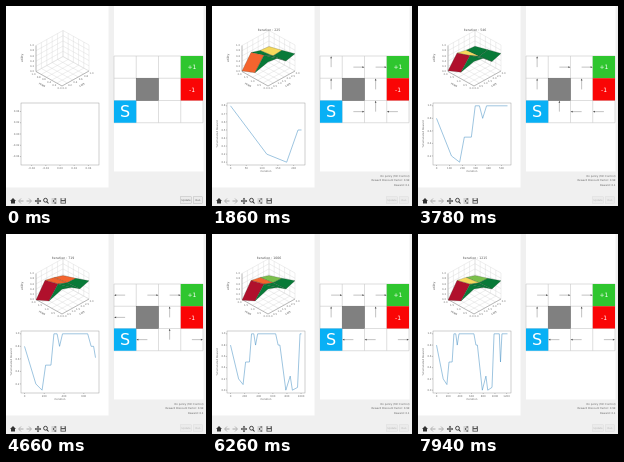
Animation, 200 px wide and 200 px high, one loop 8000 ms. Source, as an HTML page with a canvas:

```html
<!DOCTYPE html>
<html>
<head>
<meta charset="utf-8">
<style>
html, body { margin: 0; width: 100%; height: 100%; overflow: hidden; background: #f0f0f0; }
canvas { display: block; width: 200px; height: 200px; }
</style>
</head>
<body>
<canvas id="stage"></canvas>
<script>
const canvas = document.getElementById('stage');
const ctx = canvas.getContext('2d');
const ratio = window.devicePixelRatio || 1;
canvas.width = canvas.height = 200 * ratio;

const LOOP = 8000, START = 500, STEP = 80;
const heldSteps = [7, 10, 15, 18, 26, 31, 43, 78, 81, 86, 91];
const progress = [[-1, 0], [9, 118], [41, 546], [62, 877], [82, 1135], [93, 1215]];
const palette = { r: '#b0102c', o: '#f4642e', y: '#f5d95c', l: '#7cc04c', g: '#087a38' };

// Colours of the back row of faces, and policy arrows for the open cells.
const phases = [
  { from: 0, faces: 'rrr', policy: 'RRRUUURL' },
  { from: 17, faces: 'ogy', policy: 'URRUURUL' },
  { from: 33, faces: 'ryg', policy: 'URRUUULL' },
  { from: 51, faces: 'roo', policy: 'LRRLULUR' },
  { from: 72, faces: 'rol', policy: 'RRRUULLR' },
  { from: 87, faces: 'ryl', policy: 'RRRUULLR' }
];
const rewards = [
  [0, .8], [115, .2], [178, .1], [214, .5], [268, .5], [298, 1], [330, 1],
  [355, .8], [385, 1], [640, 1], [675, .8], [700, .8], [784, 0], [846, .25],
  [877, 0], [950, .05], [985, 1], [1075, 1], [1095, .5], [1120, 1], [1230, 1]
];

const mix = (a, b, p) => a + (b - a) * p;

function interpolate(points, x) {
  const i = Math.max(1, points.findIndex(([px]) => px >= x));
  const [x0, y0] = points[i - 1], [x1, y1] = points[i];
  return mix(y0, y1, (x - x0) / (x1 - x0));
}

function text(label, x, y, size, color = '#666', align = 'center', angle = 0) {
  ctx.save();
  ctx.translate(x, y);
  ctx.rotate(angle);
  ctx.font = `${size}px "DejaVu Sans", sans-serif`;
  ctx.textAlign = align;
  ctx.textBaseline = 'middle';
  ctx.fillStyle = color;
  ctx.fillText(label, 0, 0);
  ctx.restore();
}

function path(points, { stroke, fill, width = .4, close = false }) {
  ctx.beginPath();
  points.forEach(([x, y]) => ctx.lineTo(x, y));
  if (close) ctx.closePath();
  if (fill) { ctx.fillStyle = fill; ctx.fill(); }
  if (stroke) { ctx.strokeStyle = stroke; ctx.lineWidth = width; ctx.stroke(); }
}

function rect(x, y, w, h, fill) {
  ctx.fillStyle = fill;
  ctx.fillRect(x, y, w, h);
}

function frame(x, y, w, h, color, width = .5) {
  ctx.strokeStyle = color;
  ctx.lineWidth = width;
  ctx.strokeRect(x, y, w, h);
}

// col and row run 0..1 away from the front corner of the floor.
const project = (col, row, z) => [56 + 27 * col - 26 * row, 80 - 15 * col - 14.5 * row - 26 * z];

function drawCube(running) {
  const divisions = 5, grid = { stroke: '#d4d4d4', width: .4 };
  for (let i = 0; i <= divisions; i++) {
    const p = i / divisions;
    path([project(p, 0, 0), project(p, 1, 0), project(p, 1, 1)], grid);
    path([project(0, p, 0), project(1, p, 0), project(1, p, 1)], grid);
    path([project(0, 1, p), project(1, 1, p), project(1, 0, p)], grid);
    const [x, y] = project(0, 1, p);
    text(p.toFixed(1), x - 2, y, 2.5, '#666', 'right');
  }
  path([project(0, 1, 1), project(0, 1, 0), project(0, 0, 0), project(1, 0, 0)], { stroke: '#666' });

  const axisLabels = (count, unit, side, place) => {
    for (let i = 0; i <= count; i++) {
      const [x, y] = place(i / count);
      text((i * unit).toFixed(1), x + side * 2.5, y + 2.5, 2.5);
    }
  };
  axisLabels(running ? 4 : 5, running ? .5 : .2, -1, p => project(0, p, 0));
  axisLabels(running ? 6 : 5, running ? .5 : .2, 1, p => project(p, 0, 0));
  text('utility', 16.5, 52, 3, '#555', 'center', -Math.PI / 2);
  text('rows', 36, 79, 3, '#555', 'center', .5);
  text('cols', 76, 79, 3, '#555', 'center', -.5);
}

// The first column falls off steeply; the others form a ridge with a shallow dip.
function utility(col, row, step) {
  const wobble = .025 * Math.sin(step * .3 + col * 2 + row);
  if (col === 0) return .95 * (1 - row / 2) ** 2 + wobble;
  const dip = col === 2 ? .2 * (1 - row / 2) : 0;
  return .85 - .16 * row - .08 * (col - 1) - dip + wobble;
}

function drawSurface(step, backFaces) {
  const at = (c, r) => project(c / 3, r / 2, utility(c, r, step));
  for (const r of [1, 0]) {
    for (const c of [2, 1, 0]) {
      path([at(c, r), at(c + 1, r), at(c + 1, r + 1), at(c, r + 1)],
        { fill: palette[r ? backFaces[c] : 'g'], stroke: '#263326', width: .2, close: true });
    }
  }
}

function niceStep(range, most) {
  for (let base = .001; ; base *= 10)
    for (const m of [1, 2, 5])
      if (range / (base * m) <= most) return base * m;
}

function drawTicks(min, max, step, draw) {
  for (let i = Math.ceil(min / step - 1e-6); i * step <= max + 1e-6; i++) draw(i * step);
}

function drawChart(iteration) {
  let minX = -.05, maxX = .05, minY = -.05, maxY = .05, points = [];
  if (iteration) {
    points = rewards.filter(([n]) => n < iteration);
    points.push([iteration, interpolate(rewards, iteration)]);
    const values = points.map(p => p[1]);
    minX = 0; maxX = iteration;
    minY = Math.min(...values); maxY = Math.max(...values);
  }
  const px = v => mix(18.5, 89.5, (v - minX) / (maxX - minX));
  const py = v => mix(156.2, 99.8, (v - minY) / (maxY - minY));
  const stepX = iteration ? niceStep(maxX, 7) : .02;
  const stepY = iteration ? niceStep(maxY - minY, 7) : .02;
  const digits = stepY < .0999 ? 2 : 1;

  drawTicks(minX, maxX, stepX, v => {
    path([[px(v), 159], [px(v), 160]], { stroke: '#666' });
    text(iteration ? Math.round(v) : v.toFixed(2), px(v), 162, 2.6);
  });
  drawTicks(minY, maxY, stepY, v => {
    path([[14, py(v)], [15, py(v)]], { stroke: '#666' });
    text(v.toFixed(digits), 13.5, py(v), 2.6, '#666', 'right');
  });
  path(points.map(([n, v]) => [px(n), py(v)]), { stroke: '#3c8ac0', width: .5 });
  frame(15, 97, 78, 62, '#888', .4);
  if (iteration) {
    text('iteration', 54, 165.5, 2.6);
    text('%Cumulated Reward', 5.5, 128, 2.6, '#666', 'center', -Math.PI / 2);
  }
}

const CELL = 22.25, GRID_X = 108, GRID_Y = 50;

function cell(col, row, color) {
  rect(GRID_X + col * CELL, GRID_Y + row * CELL, CELL, CELL, color);
}

function arrow(col, row, direction) {
  ctx.save();
  ctx.translate(GRID_X + (col + .5) * CELL, GRID_Y + (row + .5) * CELL);
  ctx.rotate({ R: 0, U: -Math.PI / 2, L: Math.PI }[direction]);
  path([[0, 0], [10, 0]], { stroke: '#777', width: .45 });
  path([[11, 0], [9, -.8], [9, .8]], { fill: '#444' });
  ctx.restore();
}

function drawWorld(policy) {
  rect(108, 0, 89.5, 165.5, '#fff');
  for (let i = 0; i <= 4; i++) {
    const x = GRID_X + i * CELL, y = GRID_Y + i * CELL;
    path([[x, GRID_Y], [x, GRID_Y + 3 * CELL]], { stroke: '#c8c8c8', width: .6 });
    if (i < 4) path([[GRID_X, y], [GRID_X + 4 * CELL, y]], { stroke: '#c8c8c8', width: .6 });
  }
  cell(3, 0, '#2fc62f');
  cell(3, 1, '#fa0505');
  cell(1, 1, '#808080');
  cell(0, 2, '#08b0f5');
  frame(GRID_X + CELL, GRID_Y + CELL, CELL, CELL, '#666');
  text('+1', 186, 61.5, 6, '#fff');
  text('-1', 186, 84, 6, '#fff');
  text('S', 119.2, 106.8, 16, '#fff');
  if (!policy) return;
  let next = 0;
  for (let row = 0; row < 3; row++) {
    for (let col = 0; col < 4; col++) {
      const start = row === 2 && col === 0, wall = row === 1 && col === 1, goal = row < 2 && col === 3;
      if (!start && !wall && !goal) arrow(col, row, policy[next++]);
    }
  }
  ['On policy (MC Control)', 'Reward Discount Factor: 0.99', 'Reward: 0.1']
    .forEach((line, i) => text(line, 197.5, 170 + i * 4.6, 2.6, '#666', 'right'));
}

function drawToolbar(running) {
  const dark = '#333', pale = '#aaa';
  path([[4, 195], [7, 192], [10, 195], [9, 195], [9, 197.5], [5, 197.5], [5, 195]], { fill: dark });
  for (const [x, d] of [[15, -1], [23, 1]]) {
    path([[x - 2.5 * d, 195], [x + 2 * d, 195]], { stroke: pale, width: 1 });
    path([[x, 192.5], [x + 2.5 * d, 195], [x, 197.5]], { stroke: pale, width: .9 });
  }
  for (let i = 0; i < 4; i++) {
    ctx.save();
    ctx.translate(32, 195);
    ctx.rotate(i * Math.PI / 2);
    path([[0, 0], [2.5, 0]], { stroke: dark, width: .8 });
    path([[3.2, 0], [1.7, -1.2], [1.7, 1.2]], { fill: dark });
    ctx.restore();
  }
  ctx.beginPath();
  ctx.arc(39.5, 194.2, 1.9, 0, 7);
  ctx.strokeStyle = dark;
  ctx.lineWidth = .9;
  ctx.stroke();
  path([[40.8, 195.6], [42.5, 197.5]], { stroke: dark, width: 1.1 });
  for (let i = 0; i < 3; i++) {
    const y = 193 + i * 2;
    path([[45.5, y], [51, y]], { stroke: '#777', width: .5 });
    rect(i === 1 ? 47 : 48.6, y - .7, 1.1, 1.4, dark);
  }
  rect(54.5, 192.2, 5.4, 5.4, '#555');
  rect(55.6, 192.2, 3, 1.8, '#eee');
  rect(55.4, 195, 3.6, 2, '#ccc');
  const ink = running ? '#b4b4b4' : '#555', edge = running ? '#d6d6d6' : '#aaa';
  for (const [label, x, width] of [['Update', 174.5, 11], ['Run', 187.5, 9]]) {
    rect(x, 190.8, width, 6.4, '#ebebeb');
    frame(x, 190.8, width, 6.4, edge, .4);
    text(label, x + width / 2, 194, 2.5, ink);
  }
}

function draw(time) {
  const running = time >= START;
  let step = Math.floor((time - START) / STEP);
  if (heldSteps.includes(step)) step--;
  const iteration = running ? Math.round(interpolate(progress, step)) : 0;
  const phase = running && phases.filter(p => p.from <= step).pop();

  ctx.setTransform(ratio, 0, 0, ratio, 0, 0);
  rect(0, 0, 200, 200, '#f0f0f0');
  rect(0, 0, 102.5, 181.5, '#fff');
  drawCube(running);
  if (running) {
    drawSurface(step, phase.faces);
    text(`Iteration : ${iteration}`, 57, 24.2, 3.2, '#555');
  }
  drawChart(iteration);
  drawWorld(phase && phase.policy);
  drawToolbar(running);
}

function tick() {
  draw(performance.now() % LOOP);
  requestAnimationFrame(tick);
}
tick();
</script>
</body>
</html>
```
